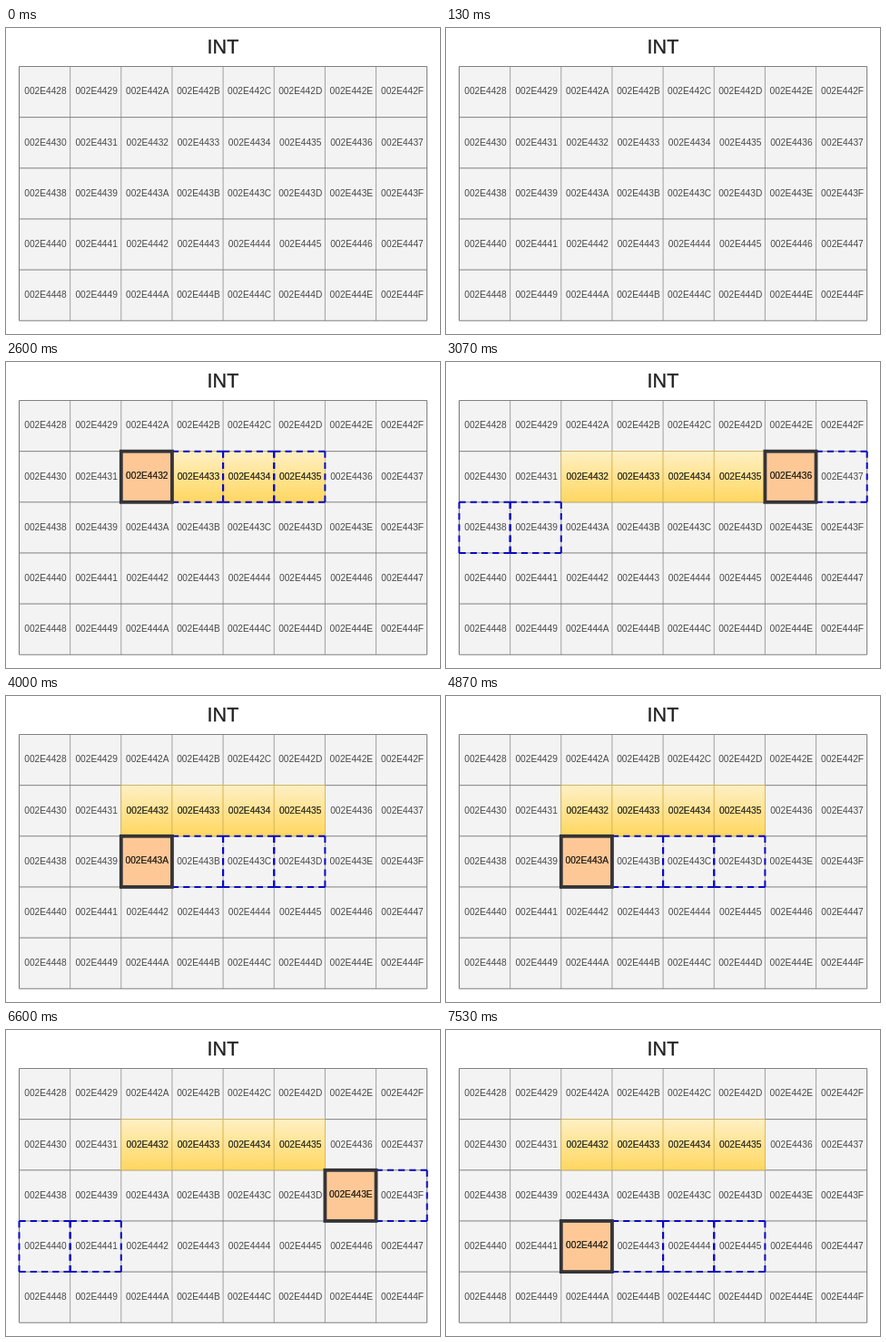
Write an HTML page with a canvas that moves like this. It is 478x338 px and loops after 8 s.

```html
<!DOCTYPE html>
<html lang="en">
<head>
<meta charset="utf-8">
<title>INT</title>
<style>
  html, body { margin: 0; width: 100%; height: 100%; overflow: hidden; background: #fff; }
  canvas { display: block; width: 478px; height: 338px; }
</style>
</head>
<body>
<canvas id="stage"></canvas>
<script>
const W = 478, H = 338, LOOP = 8000;
const COLS = 8, ROWS = 5, CELL = 56.15, LEFT = 14.5, TOP = 42.5;
const BASE = 0x2E4428, FIRST = 10, SIZE = 4;
const MOVES = [1330, 2670, 4000, 5330, 6670];
const FONT = '"Liberation Sans", Arial, sans-serif';

const canvas = document.getElementById('stage');
const dpr = window.devicePixelRatio || 1;
canvas.width = W * dpr;
canvas.height = H * dpr;
const ctx = canvas.getContext('2d');
ctx.scale(dpr, dpr);

const colX = c => LEFT + c * CELL;
const rowY = r => TOP + r * CELL;
const cellAt = i => ({ x: colX(i % COLS), y: rowY(Math.floor(i / COLS)) });

function label(i, dx, dy, color) {
  const text = (BASE + i).toString(16).toUpperCase().padStart(8, '0');
  const { x, y } = cellAt(i);
  ctx.font = '10.2px ' + FONT;
  ctx.textAlign = 'center';
  ctx.fillStyle = color;
  ctx.fillText(text, x + CELL / 2 + dx, y + 30.9 + dy);
}

// Painting twice thickens the antialiased edges a little.
function strongLabel(i, dx, dy, color) {
  label(i, dx, dy, color);
  label(i, dx, dy, color);
}

function line(x1, y1, x2, y2, color, width = 1) {
  ctx.strokeStyle = color;
  ctx.lineWidth = width;
  ctx.beginPath();
  ctx.moveTo(x1, y1);
  ctx.lineTo(x2, y2);
  ctx.stroke();
}

function drawGrid() {
  const right = colX(COLS), bottom = rowY(ROWS);
  ctx.fillStyle = '#f3f3f3';
  ctx.fillRect(LEFT, TOP, right - LEFT, bottom - TOP);
  for (let c = 0; c <= COLS; c++) {
    line(colX(c), TOP, colX(c), bottom, c % COLS ? '#a0a0a0' : '#777');
  }
  for (let r = 0; r <= ROWS; r++) {
    line(LEFT, rowY(r), right, rowY(r), '#808080');
  }
  for (let i = 0; i < COLS * ROWS; i++) label(i, 0.9, 0, '#484848');
}

function drawValue(i) {
  const { x, y } = cellAt(i);
  const shade = ctx.createLinearGradient(0, y, 0, y + CELL);
  shade.addColorStop(0, '#fff0c4');
  shade.addColorStop(1, '#ffd760');
  ctx.fillStyle = shade;
  ctx.fillRect(x, y, CELL, CELL);
  ctx.strokeStyle = '#d6b656';
  ctx.lineWidth = 0.8;
  ctx.strokeRect(x, y, CELL, CELL);
  strongLabel(i, 0.9, 0, '#3a3626');
}

// Every edge runs right or down, so dashes on shared edges coincide.
function drawDashed(i) {
  const { x, y } = cellAt(i);
  const right = x + CELL, bottom = y + CELL;
  const edges = [
    [x, y, right, y], [x, bottom, right, bottom],
    [x, y, x, bottom], [right, y, right, bottom]
  ];
  ctx.setLineDash([7.2, 5.04]);
  for (const edge of edges) line(...edge, '#0808c4', 2);
  ctx.setLineDash([]);
}

function drawPointer(i) {
  const { x, y } = cellAt(i);
  ctx.fillStyle = '#fdc896';
  ctx.fillRect(x, y, CELL, CELL);
  ctx.strokeStyle = '#343438';
  ctx.lineWidth = 3.8;
  ctx.strokeRect(x, y, CELL, CELL);
  strongLabel(i, 0.4, -0.6, '#30281f');
}

function drawTitle() {
  ctx.font = '21.6px ' + FONT;
  ctx.textAlign = 'center';
  ctx.fillStyle = ctx.strokeStyle = '#202020';
  ctx.lineWidth = 0.3;
  ctx.fillText('INT', 239, 28);
  ctx.strokeText('INT', 239, 28);
}

function draw(t) {
  ctx.fillStyle = '#fff';
  ctx.fillRect(0, 0, W, H);
  drawTitle();
  drawGrid();

  const step = MOVES.filter(m => t >= m).length;
  if (!step) return;
  const pointer = FIRST + (step - 1) * SIZE;
  for (let k = 0; k < SIZE; k++) drawValue(FIRST + k);
  for (let k = 1; k < SIZE; k++) drawDashed(pointer + k);
  drawPointer(pointer);
}

function frame() {
  draw(performance.now() % LOOP);
  requestAnimationFrame(frame);
}
frame();
</script>
</body>
</html>
```
